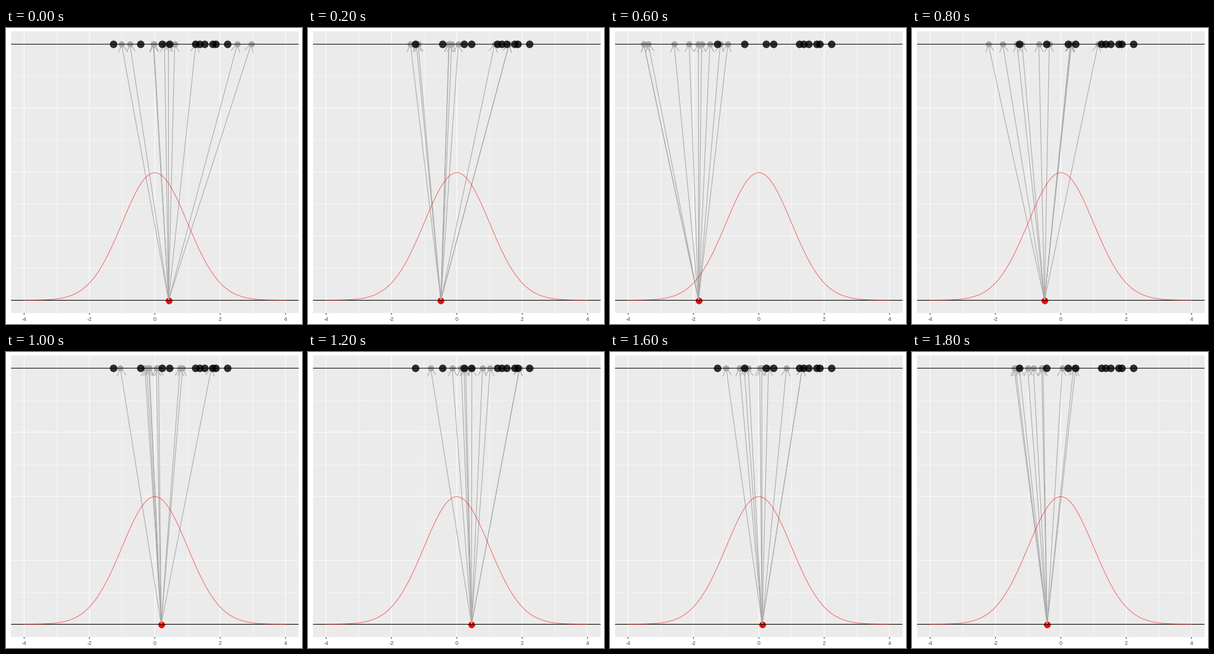
Animation of 480x480 px, one loop 2 s. Source, as a matplotlib script:

```python
import numpy as np
import matplotlib.pyplot as plt
from matplotlib.animation import FuncAnimation
from matplotlib.collections import LineCollection
from matplotlib.patches import Rectangle

plt.rcParams["path.snap"] = False
plt.rcParams["font.family"] = "Liberation Sans"

SIZE = 480
LEFT, TOP, RIGHT, BOTTOM = 8.2, 5.5, 474.5, 462.3
LINE = 1.07
HEAD = 14.17  # arrow head length in pixels
GREY = "#a9a9a9"

OBSERVED = [-1.265, -0.44, 0.225, 0.446, 1.24, 1.37, 1.516, 1.776, 1.87, 2.22]

# Parameter value of each draw, with the lowest and highest simulated point.
DRAWS = [
    (0.42, -1.02, 2.95), (-0.49, -1.42, 1.6), (0.96, 0.22, 2.235),
    (-1.845, -3.52, -0.95), (-0.5, -2.22, 1.14), (0.195, -1.055, 1.73),
    (0.45, -0.8, 1.92), (-0.1, -1.14, 2.07), (0.1, -1.0, 1.33),
    (-0.42, -1.43, 0.45),
]


def px(x):
    return (LEFT + RIGHT) / 2 + (RIGHT - LEFT) / 8.8 * np.asarray(x)


def py(y):
    return BOTTOM - (BOTTOM - TOP) / 0.88 * (np.asarray(y) + 0.04)


FLOOR, CEILING = float(py(0)), float(py(0.8))

rng = np.random.default_rng(4)
fig = plt.figure(figsize=(SIZE / 72, SIZE / 72), dpi=72, facecolor="white")
ax = fig.add_axes([0, 0, 1, 1])
ax.set_xlim(0, SIZE)
ax.set_ylim(SIZE, 0)
ax.axis("off")


def simulate(theta, low, high):
    """Ten points, normally spread around theta, that reach from low to high."""
    r = np.append(rng.normal(0, 0.5, 8).clip(-1, 1), [-1, 1])
    return theta + r * np.where(r > 0, high - theta, theta - low)


def stroke(xs, ys, color, width=LINE, z=1, **kw):
    ax.plot(xs, ys, color=color, lw=width, zorder=z, solid_capstyle="butt", **kw)


def dots(color, radius, z, **kw):
    return ax.plot([], [], "o", color=color, ms=2 * radius, mew=0.7, zorder=z, **kw)[0]


def draw_panel():
    ax.add_patch(Rectangle((LEFT, TOP), RIGHT - LEFT, BOTTOM - TOP,
                           fc="#ebebeb", ec="none", zorder=0))
    for i in range(9):
        width = LINE if i % 2 == 0 else LINE / 2
        stroke([px(i - 4)] * 2, [TOP, BOTTOM], "white", width)
        stroke([LEFT, RIGHT], [py(i / 10)] * 2, "white", width)
    for i in range(-4, 5, 2):
        stroke([px(i)] * 2, [BOTTOM, BOTTOM + 2.74], "#333333")
        ax.text(px(i), 474.8, str(i), size=8.8, color="#4d4d4d",
                ha="center", va="baseline")
    for y in (FLOOR, CEILING):
        stroke([LEFT, RIGHT], [y, y], "black", z=6)
    x = np.linspace(-4, 4, 101)
    density = np.exp(-x**2 / 2) / np.sqrt(2 * np.pi)
    stroke(px(x), py(density), "red", z=7, alpha=0.55)


def arrow(x0, x1):
    """Shaft and open head of an arrow from the floor to the ceiling."""
    start, tip = np.array([x0, FLOOR]), np.array([x1, CEILING])
    angle = np.arctan2(*(start - tip)[::-1])
    barbs = [tip + HEAD * np.array([np.cos(a), np.sin(a)])
             for a in (angle - np.pi / 6, angle + np.pi / 6)]
    return [np.array([start, tip]), np.array([barbs[0], tip, barbs[1]])]


draw_panel()
theta_dots = dots("red", 4.62, 3)
arrows = LineCollection([], colors=GREY, linewidths=LINE, zorder=4)
ax.add_collection(arrows, autolim=False)
sample_dots = dots(GREY, 4.62, 5)
for value in OBSERVED:
    dots("black", 5.69, 8, alpha=0.8).set_data([px(value)], [CEILING])

samples = [simulate(*draw) for draw in DRAWS]


def update(i):
    x0, xs = float(px(DRAWS[i][0])), px(samples[i])
    theta_dots.set_data([x0] * len(xs), [FLOOR] * len(xs))
    sample_dots.set_data(xs, [CEILING] * len(xs))
    arrows.set_segments([part for x in xs for part in arrow(x0, x)])
    return theta_dots, arrows, sample_dots


anim = FuncAnimation(fig, update, frames=len(DRAWS), interval=200,
                     repeat=True, repeat_delay=0)
plt.show()
```
